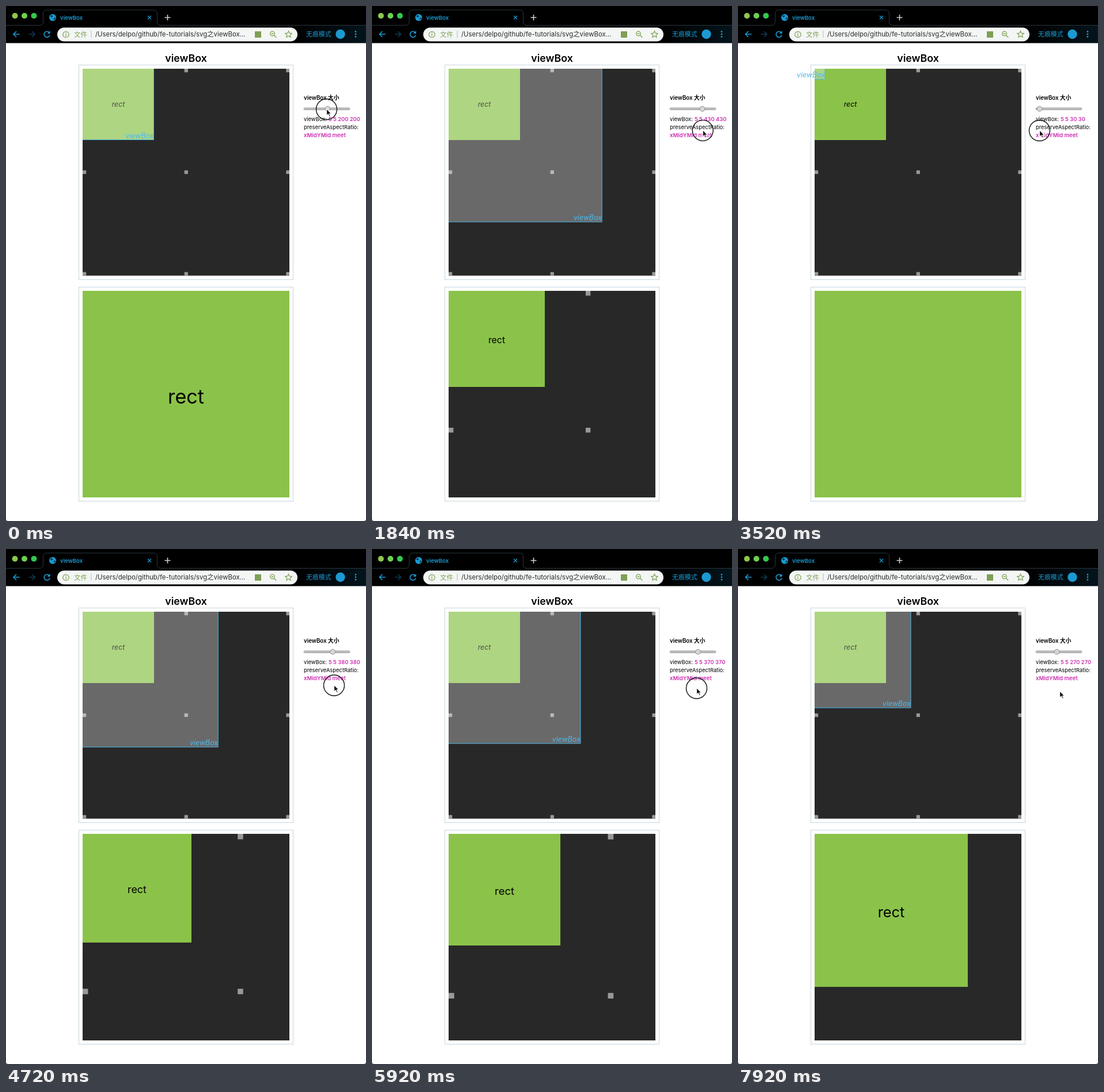
Recreate the animation shown at these times as an HTML page with a canvas. Size 625 px wide and 895 px high, loop 8 s.

```html
<!DOCTYPE html>
<html lang="zh">
<head>
<meta charset="utf-8">
<title>viewBox</title>
<style>
  html, body { margin: 0; height: 100%; overflow: hidden; background: #fff; }
  canvas { display: block; }
</style>
</head>
<body>
<canvas id="stage" width="625" height="895"></canvas>
<script>
const ctx = document.getElementById('stage').getContext('2d');
const LOOP = 8000, STEP = 80, RELEASE = 7600;
const SIZE = 580, SCALE = 0.62, LEFT = 133, SIDE = 359;
const GREEN = '#8bc34a', DARK = '#282828', BLUE = '#1b9ad2', OLIVE = '#7f9f55', PINK = '#cb2fb0';
const FAMILY = 'Inter, "Noto Sans CJK SC", "Noto Sans CJK", sans-serif';

// time, pointer x, pointer y, viewBox size
const keys = [
  [0, 556.5, 179.5, 310],
  [1040, 585, 214, 510],
  [2480, 558.5, 217, 310],
  [3520, 523.5, 216.5, 30],
  [4720, 569.5, 237, 380],
  [5920, 563.5, 242, 370],
  [7600, 558.5, 247.5, 270],
  [8000, 558.5, 247.5, 270]
];

// Monotone cubic interpolation of one key column
function track(t, col) {
  const slope = i => (keys[i + 1][col] - keys[i][col]) / (keys[i + 1][0] - keys[i][0]);
  const tangent = i => {
    if (i === 0 || i === keys.length - 1) return 0;
    const a = slope(i - 1), b = slope(i);
    return a * b > 0 ? 2 * a * b / (a + b) : 0;
  };
  let i = 0;
  while (i < keys.length - 2 && t >= keys[i + 1][0]) i++;
  const h = keys[i + 1][0] - keys[i][0], u = (t - keys[i][0]) / h, v = 1 - u;
  return keys[i][col] * (1 + 2 * u) * v * v + tangent(i) * h * u * v * v
    + keys[i + 1][col] * u * u * (3 - 2 * u) - tangent(i + 1) * h * u * u * v;
}

function box(x, y, w, h, fill) {
  ctx.fillStyle = fill;
  ctx.fillRect(x, y, w, h);
}

function outline(x, y, w, h, color) {
  ctx.strokeStyle = color;
  ctx.lineWidth = 1;
  ctx.strokeRect(x, y, w, h);
}

function disc(x, y, r, fill, stroke, width = 1) {
  ctx.beginPath();
  ctx.arc(x, y, r, 0, 7);
  if (fill) { ctx.fillStyle = fill; ctx.fill(); }
  if (stroke) { ctx.strokeStyle = stroke; ctx.lineWidth = width; ctx.stroke(); }
}

function path(d, stroke, width = 1.4, fill) {
  const p = new Path2D(d);
  if (fill) { ctx.fillStyle = fill; ctx.fill(p); }
  if (stroke) { ctx.strokeStyle = stroke; ctx.lineWidth = width; ctx.stroke(p); }
}

function pill(x, y, w, h, r, fill, stroke) {
  ctx.beginPath();
  ctx.roundRect(x, y, w, h, r);
  ctx.fillStyle = fill;
  ctx.fill();
  if (stroke) { ctx.strokeStyle = stroke; ctx.lineWidth = 1; ctx.stroke(); }
}

function text(str, x, y, size, color = '#000', style = '', align = 'left') {
  ctx.font = `${style} ${size}px ${FAMILY}`;
  ctx.textAlign = align;
  ctx.fillStyle = color;
  ctx.fillText(str, x, y);
}

function drawBrowser() {
  const bar = ctx.createLinearGradient(0, 0, 625, 0);
  bar.addColorStop(0, '#000');
  bar.addColorStop(0.8, '#000');
  bar.addColorStop(1, '#04141c');
  box(0, 0, 625, 34, '#000');
  box(0, 34, 625, 30.5, bar);
  path('M0 33.5H58Q64.5 33.5 64.5 27V13Q64.5 7 71 7H256Q262.5 7 262.5 13V27Q262.5 33.5 269 33.5H625', '#29363d', 1);
  ['#8fc64f', '#6fcf50', '#34c84f'].forEach((c, i) => disc(15.5 + i * 16.5, 17, 5, c));

  disc(81, 20, 6, BLUE);
  path('M76.5 17.5l3-1.5 2 1.5-2 2.5zM82 24l2-4 2 .5-1 2z', null, 0, '#062a3c');
  text('viewBox', 94, 23.5, 9.6, BLUE, '600');
  path('M246 17l6 6M252 17l-6 6', BLUE, 1.3);
  path('M275.5 20h10M280.5 15v10', '#c9d6c4', 1.6);

  path('M23.5 49H13M18 44l-5 5 5 5', BLUE, 1.6);
  path('M39.5 49H50M45 44l5 5-5 5', '#0e3b52', 1.6);
  path('M75 46A5 5 0 1 0 76 50.5', BLUE, 1.6);
  path('M76.5 43v5h-5z', null, 0, BLUE);

  pill(89, 37.5, 417, 24, 12, '#f3f6f5');
  disc(104, 49.5, 5.2, null, OLIVE, 1.2);
  path('M104 46v1.4M104 48.6v4', OLIVE, 1.3);
  text('文件', 118, 53.5, 11.5, OLIVE);
  box(147.5, 43, 1, 12, '#b5bcae');
  text('/Users/delpo/github/fe-tutorials/svg之viewBox...', 155, 53.2, 11.4, '#2a2c2a');
  box(432, 44, 11, 11, OLIVE);
  disc(462.5, 48, 3.8, null, OLIVE, 1.3);
  path('M465.3 50.8l4 4M460.7 48h3.6', OLIVE, 1.3);
  path('M490.5 43.5l1.7 3.7 4 .4-3 2.7.9 4-3.6-2.1-3.6 2.1.9-4-3-2.7 4-.4z', OLIVE, 1.2);
  text('无痕模式', 521, 53.3, 10.9, BLUE);
  disc(580.5, 49, 8.2, BLUE);
  [44.5, 49, 53.5].forEach(y => disc(607, y, 1.4, BLUE));
}

// The shared scene: dark square, nine markers, green rect with a label
function drawScene(top, scale, fontUnits, style, drop) {
  const size = fontUnits * scale;
  ctx.save();
  ctx.beginPath();
  ctx.rect(LEFT, top, SIDE, SIDE + 1);
  ctx.clip();
  box(LEFT, top, SIZE * scale, SIZE * scale, DARK);
  for (const x of [0, 285, 570])
    for (const y of [0, 285, 570])
      box(LEFT + x * scale, top + y * scale, 10 * scale, 10 * scale, '#999');
  box(LEFT, top, 200 * scale, 200 * scale, GREEN);
  text('rect', LEFT + 100 * scale, top + 100 * scale + size * drop, size, '#000', style, 'center');
  ctx.restore();
}

function drawPanels(view) {
  outline(126.5, 102.5, 372, 373, '#c5d6df');
  outline(126.5, 488.5, 372, 372, '#c5d6df');

  drawScene(109, SCALE, 20, 'italic', 0.34);
  const side = view * SCALE;
  box(LEFT, 109, side, side, 'rgba(255,255,255,.3)');
  path(`M${LEFT + side - 0.5} 109v${side - 0.5}H${LEFT}`, '#45afe0', 1);
  text('viewBox', LEFT + side - 0.5, 109 + side - 3.2, 12.4, '#4fb9ea', 'italic', 'right');

  ctx.save();
  ctx.beginPath();
  ctx.rect(LEFT, 495, SIDE, SIDE);
  ctx.clip();
  drawScene(495, SIDE / view, 19, '', 0.47);
  ctx.restore();
}

function drawControls(view, thumb) {
  text('viewBox 大小', 517, 162.5, 9.7, '#000', '600');
  pill(517, 177, 80, 3.4, 1.7, '#bdbdbd', '#a5a5a5');
  disc(thumb, 178.7, 4.4, '#d6d6d6', '#8f8f8f');
  text('viewBox:', 517, 199.7, 9.4);
  text(`5 5 ${view} ${view}`, 560, 199.7, 9.4, PINK, '600');
  text('preserveAspectRatio:', 517, 213.8, 9.4);
  text('xMidYMid meet', 517, 227.8, 9.6, PINK, '600');
}

function drawPointer(x, y, pressed) {
  if (pressed) disc(x, y, 18, null, '#111', 1.4);
  ctx.save();
  ctx.translate(x, y);
  path('M0 -1V11L2.8 8.5 4.7 12.8 6.8 11.9 5 7.8H8.5Z', '#fff', 1.2, '#111');
  ctx.restore();
}

function draw(now) {
  const t = Math.floor(now % LOOP / STEP) * STEP;
  const dragged = Math.round(track(t, 3) / 10) * 10;
  const view = t < 2 * STEP ? 200 : dragged;
  box(0, 0, 625, 895, '#fff');
  drawBrowser();
  text('viewBox', 312.5, 97, 17.8, '#000', '600', 'center');
  drawPanels(view);
  drawControls(view, 519.75 + dragged * 0.125);
  drawPointer(track(t, 1), track(t, 2), t < RELEASE);
  path('M0 891Q0 895 4 895H0zM625 891Q625 895 621 895H625z', null, 0, '#4a5a60');
}

const start = performance.now();
function tick() {
  draw(performance.now() - start);
  requestAnimationFrame(tick);
}
tick();
</script>
</body>
</html>
```
